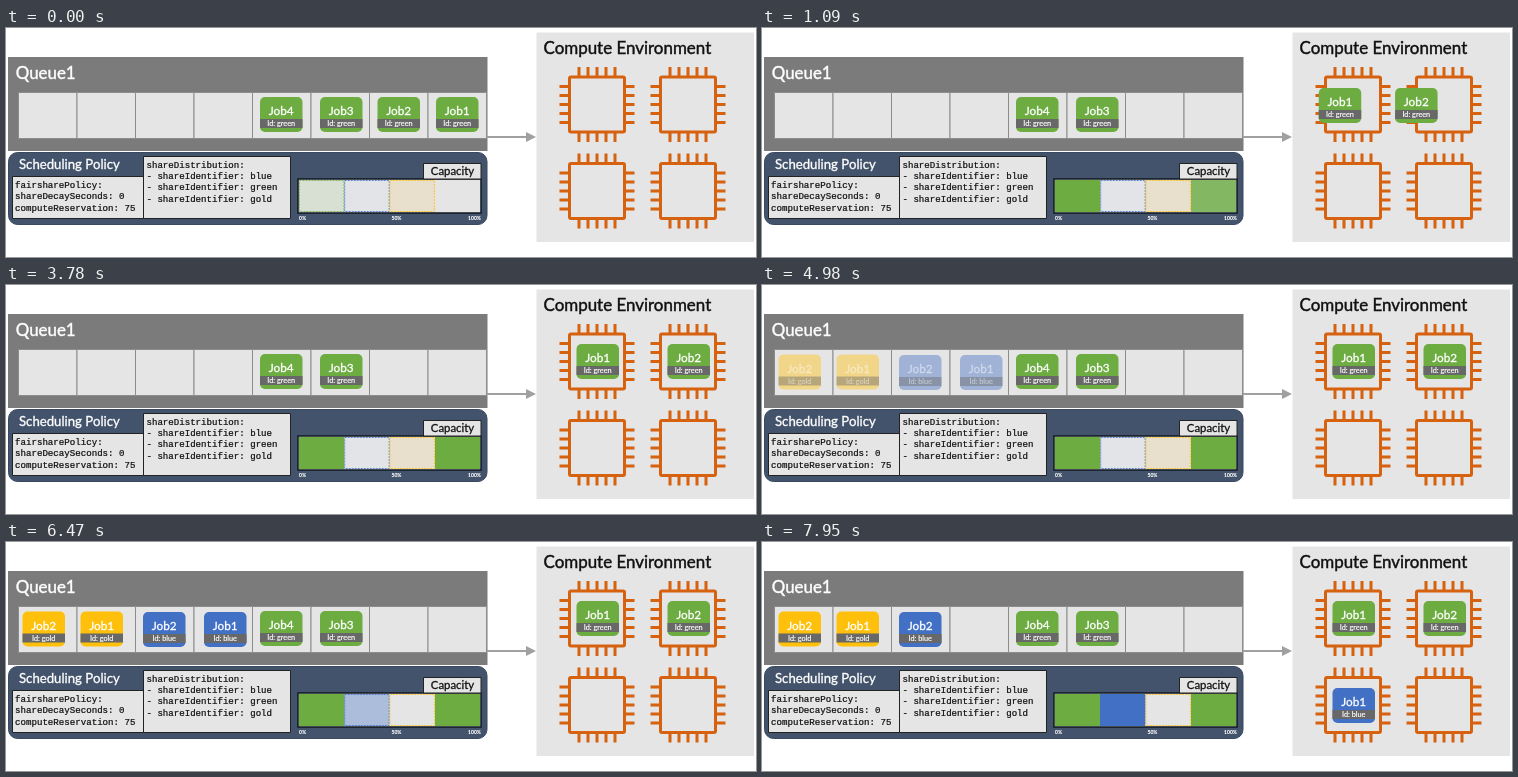
Animation of 750 by 229 pixels, one loop 8000 ms. Source, as an HTML page with a canvas:

```html
<!DOCTYPE html>
<html lang="en">
<head>
<meta charset="utf-8">
<title>Fair share scheduling</title>
<style>
html, body { margin: 0; width: 100%; height: 100%; overflow: hidden; background: #fff; }
canvas { display: block; }
</style>
</head>
<body>
<canvas id="stage" width="750" height="229"></canvas>
<script>
const ctx = document.getElementById('stage').getContext('2d');
const LOOP = 8000;
const SANS = 'Lato, sans-serif', MONO = '"Liberation Mono", monospace';
const GREEN = '#6cac41', BLUE = '#4270c5', GOLD = '#ffc00c', ORANGE = '#d6610f', PALE = '#e6e5e5';

// The picture moves in steps, held between these moments.
const STEPS = [0, 500, 640, 790, 940, 1090, 1240, 1390, 4830, 4980, 5120, 5270,
               6470, 6620, 6770, 6920, 7060, 7210, 7360];

const clamp = v => Math.max(0, Math.min(1, v));
const ramp = (t, start, length) => clamp((t - start) / length);
const glide = (t, start) => (1 - Math.cos(Math.PI * ramp(t, start, 740))) / 2;
const mix = (a, b, p) => a + (b - a) * p;

function box(x, y, w, h, fill, stroke, radius = 0, line = 1) {
  ctx.beginPath();
  ctx.roundRect(x, y, w, h, radius);
  if (fill) { ctx.fillStyle = fill; ctx.fill(); }
  if (stroke) { ctx.strokeStyle = stroke; ctx.lineWidth = line; ctx.stroke(); }
}

// A hairline around the glyphs gives the slightly heavier weight.
function text(str, x, y, size, { color = '#fff', font = SANS, align = 'left', weight = 400 } = {}) {
  ctx.font = `${weight} ${size}px ${font}`;
  ctx.fillStyle = ctx.strokeStyle = color;
  ctx.lineWidth = size * 0.025;
  ctx.textAlign = align;
  ctx.fillText(str, x, y);
  ctx.strokeText(str, x, y);
}

function fade(alpha, draw) {
  ctx.globalAlpha = alpha;
  draw();
  ctx.globalAlpha = 1;
}

function job(x, y, number, id, color) {
  box(x, y, 42.5, 35, color, null, 5);
  ctx.fillStyle = '#686868';
  ctx.fillRect(x, y + 22, 42.5, 9);
  text('Job' + number, x + 21.2, y + 18, 11.8, { align: 'center' });
  text('Id: ' + id, x + 21.2, y + 29, 7.3, { align: 'center' });
}

function chip(cx, cy) {
  ctx.strokeStyle = ORANGE;
  ctx.lineWidth = 3;
  ctx.beginPath();
  for (let k = -2; k <= 2; k++) {
    const d = k * 9;
    for (const side of [-1, 1]) {
      ctx.moveTo(cx + d, cy + side * 28);
      ctx.lineTo(cx + d, cy + side * 37.5);
      ctx.moveTo(cx + side * 28, cy + d);
      ctx.lineTo(cx + side * 37.5, cy + d);
    }
  }
  ctx.stroke();
  box(cx - 27.5, cy - 27.5, 55, 55, PALE, ORANGE, 1.5, 3);
}

function queue() {
  box(2, 29, 479.5, 94, '#7b7b7b');
  text('Queue1', 9.8, 50.5, 16.9);
  for (let i = 0; i < 8; i++) box(12.5 + i * 58.5, 64.5, 58.5, 46, PALE, '#8c8c8c');
}

function environment() {
  box(530.5, 4.5, 217.5, 209.5, PALE);
  text('Compute Environment', 537.5, 26, 16.95, { color: '#111' });
  for (const x of [591, 682]) for (const y of [76.5, 163]) chip(x, y);
  ctx.fillStyle = '#a0a0a0';
  ctx.fillRect(481, 108, 41, 2);
  ctx.beginPath();
  ctx.moveTo(520, 104);
  ctx.lineTo(530, 109);
  ctx.lineTo(520, 114);
  ctx.fill();
}

function policy() {
  box(2.5, 124.5, 478.5, 72, '#43536b', '#394960', 9);
  text('Scheduling Policy', 13, 140.5, 13.2);
  box(6.5, 148.5, 138, 42, PALE, '#222');
  box(137.5, 128.5, 147, 62, PALE, '#222');
  const mono = { color: '#111', font: MONO };
  ['fairsharePolicy:', 'shareDecaySeconds: 0', 'computeReservation: 75']
    .forEach((s, i) => text(s, 9, 160 + i * 11.4, 9.15, mono));
  ['shareDistribution:', '- shareIdentifier: blue', '- shareIdentifier: green', '- shareIdentifier: gold']
    .forEach((s, i) => text(s, 140.5, 139.5 + i * 11.4, 9.1, mono));
}

function capacity(t) {
  box(292, 151, 183, 34, PALE, '#111722', 0, 1.5);
  box(417.5, 135.5, 57.5, 15.5, PALE, '#222');
  text('Capacity', 446.5, 147.3, 11.4, { color: '#111', align: 'center' });

  const shares = [['#d7e0d2', GREEN], ['#e3e4e7', BLUE], [t < 5120 ? '#e8dfcc' : PALE, GOLD]];
  ctx.setLineDash([2, 1]);
  shares.forEach(([fill, edge], i) => box(293.5 + i * 45.2, 152.5, 44.5, 31, fill, edge, 0, 0.8));
  ctx.setLineDash([]);

  const fill = (x, p, color) => fade(p, () => box(x, 152, 45, 32, color));
  fill(293, t < 500 ? 0 : ramp(t, 300, 500), GREEN);
  fill(429, ramp(t, 690, 500), GREEN);
  fill(338, t < 6470 ? 0 : ramp(t, 6300, 500), BLUE);

  const label = { align: 'center', weight: 700 };
  text('0%', 296.5, 192, 5, label);
  text('50%', 390.5, 192, 5, label);
  text('100%', 468.5, 192, 5, label);
}

function jobs(t) {
  job(254, 69, 4, 'green', GREEN);
  job(314, 69, 3, 'green', GREEN);

  const sent = glide(t, 500);
  job(mix(430, 570.5, sent), mix(69, 59, sent), 1, 'green', GREEN);
  job(mix(371.5, 661.5, sent), mix(69, 59, sent), 2, 'green', GREEN);

  const next = glide(t, 6470);
  fade(ramp(t, 4770, 490), () => {
    job(16.5, 69.5, 2, 'gold', GOLD);
    job(74.5, 69.5, 1, 'gold', GOLD);
    job(137, 70, 2, 'blue', BLUE);
    job(mix(198, 570.5, next), mix(70, 146, next), 1, 'blue', BLUE);
  });
}

let shownStep = -1;
function frame(now) {
  const time = now % LOOP;
  const step = STEPS.findLast(s => s <= time);
  if (step !== shownStep) {
    shownStep = step;
    box(0, 0, 750, 229, '#fff');
    queue();
    environment();
    policy();
    capacity(step);
    jobs(step);
  }
  requestAnimationFrame(() => frame(performance.now()));
}
frame(performance.now());
</script>
</body>
</html>
```
